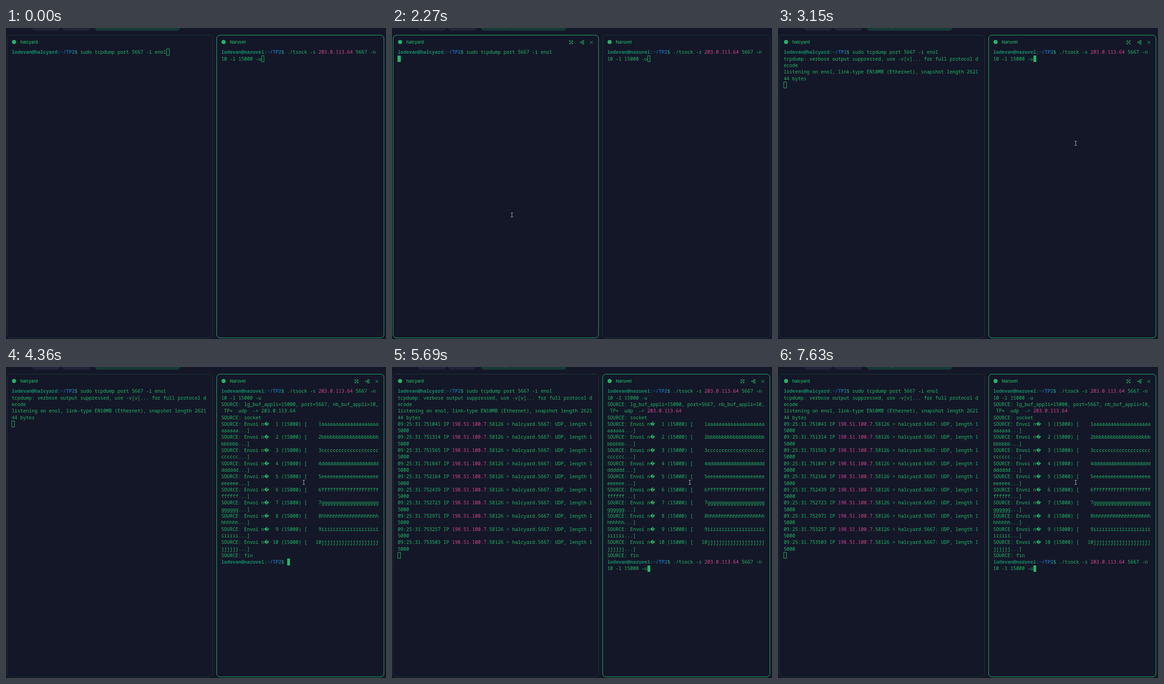
Animation, 827 px wide and 677 px high, one loop 8 s. Source, as an HTML page:

```html
<!DOCTYPE html>
<html lang="en">
<head>
<meta charset="utf-8">
<title>Terminal panes</title>
<style>
  :root { --bg: #141728; --green: #1fb866; --dim: #17392f; --teal: #118b68; --blue: #1769a6; --pink: #d6468f; }
  html, body { margin: 0; width: 100%; height: 100%; overflow: hidden; background: var(--bg); }
  #stage { position: relative; width: 827px; height: 677px; overflow: hidden; background: var(--bg); color: var(--green); }
  #stage > * { position: absolute; }
  .tab { top: -20px; height: 26px; border-radius: 8px; background: #212436; }
  .tab.on { background: #173a37; }
  .tab.on::after { content: ""; position: absolute; left: 54px; top: 20px; width: 2px; height: 1px; background: #1b8a5b; }
  .pane { top: 15px; height: 659.5px; box-sizing: border-box; border: 1px solid var(--dim); border-radius: 8px; }
  .pane::after { content: ""; position: absolute; inset: -1px; border: 1px solid var(--green); border-radius: 8px; opacity: var(--focus, 0); }
  .dot { position: absolute; left: 10px; top: 10px; width: 9px; height: 9px; border-radius: 50%; background: var(--green); }
  .title { position: absolute; left: 28px; top: 8px; font: 500 9.3px/13px Inter, Lato, sans-serif; white-space: pre; }
  .tools { position: absolute; right: 8px; top: 8px; width: 60px; height: 14px; fill: none; stroke: var(--green); }
  .screen { top: 45.4px; font: 10.39px/14.31px "Noto Sans Mono", "DejaVu Sans Mono", monospace; white-space: pre; font-variant-ligatures: none; }
  .row { height: 14.31px; }
  .screen b { color: var(--teal); }
  .screen b + b { color: var(--blue); }
  .screen i { color: var(--pink); font-style: normal; }
  .screen u { display: inline-block; width: 6.234px; font: 10.39px/1 "DejaVu Sans", sans-serif; text-decoration: none; }
  .cursor { position: absolute; box-sizing: border-box; width: 6.6px; height: 14.3px; border: 1px solid var(--green); }
  .cursor.solid { background: var(--green); }
  #mouse { left: -5px; top: -7px; width: 10px; height: 14px; fill: none; }
</style>
</head>
<body>
<div id="stage">
  <div class="tab" style="left:56px;width:62px"></div>
  <div class="tab" style="left:122px;width:62px"></div>
  <div class="tab on" style="left:193px;width:187px"></div>
  <div class="pane" style="left:2px;width:448px"><span class="dot"></span><span class="title">halcyard</span></div>
  <div class="pane" style="left:458px;width:365px"><span class="dot"></span><span class="title">Naruvel</span></div>
  <div class="screen" style="left:12.4px"></div>
  <div class="screen" style="left:468.4px"></div>
  <svg id="mouse" viewBox="-5 -7 10 14">
    <path id="beam" d="M-2.5-4.5H-.7L0-4L.7-4.5H2.5M0-4V4M-2.5 4.5H-.7L0 4L.7 4.5H2.5" stroke="#0a0c14" stroke-width="2.4"/>
    <use href="#beam" style="stroke:#c9ccd4"/>
    <path d="M-2.5-4.5H-.7L0-4L.7-4.5H2.5M0-4V4M-2.5 4.5H-.7L0 4L.7 4.5H2.5" stroke="#c9ccd4"/>
  </svg>
</div>
<script>
const LOOP = 8000, CELL = 6.234, LINE = 14.31;
const panes = [...document.querySelectorAll('.pane')];
const screens = [...document.querySelectorAll('.screen')];
const mouse = document.getElementById('mouse');

const TOOLS = `<svg class="tools" viewBox="0 0 60 14">
  <path d="M5.5 4L12 10.5M12 4L5.5 10.5M5.2 6.2V3.7H7.7M9.8 3.7H12.3V6.2M12.3 8.3V10.8H9.8M7.7 10.8H5.2V8.3"/>
  <path d="M28 7.2H36.5M32.5 3.8V10.6M32.5 3.8H36.5M32.5 10.6H36.5"/>
  <path d="M28 7.2H30M35 3.8H36.8M35 7.2H36.8M35 10.6H36.8" stroke-width="2"/>
  <path d="M49.8 4.2L56 10.4M56 4.2L49.8 10.4"/></svg>`;
panes.forEach(p => p.insertAdjacentHTML('beforeend', TOOLS));
const tools = panes.map(p => p.querySelector('.tools'));

const SERVER = '203.0.113.64', CLIENT = '198.51.100.7';
const ip = (text, lit) => lit ? `<i>${text}</i>` : text;
const prompt = host => `<b>lodevan@${host}</b>:<b>~/TP2</b>$ `;
const sendCmd = lit => [prompt('naruvel') + `./tsock -s ${ip(SERVER, lit)} 5667 -n`, '10 -l 15000 -u'];

const listenCmd = prompt('halcyard') + 'sudo tcpdump port 5667 -i eno1';
const banner = [
  'tcpdump: verbose output suppressed, use -v[v]... for full protocol d', 'ecode',
  'listening on eno1, link-type EN10MB (Ethernet), snapshot length 2621', '44 bytes'
];
const micros = [751041, 751314, 751565, 751847, 752164, 752439, 752723, 752971, 753257, 753503];
const packets = lit => micros.flatMap(us => [
  `09:25:31.${us} IP ${ip(CLIENT, lit)}.58126 > halcyard.5667: UDP, length 1`, '5000'
]);

function sendLog(lit) {
  const out = ['SOURCE: lg_buf_appli=15000, port=5667, nb_buf_appli=10,',
    ` TP=  udp  -> ${ip(SERVER, lit)}`, 'SOURCE: socket'];
  for (let n = 1; n <= 10; n++) {
    const c = String.fromCharCode(96 + n);
    out.push(`SOURCE: Envoi n<u>\uFFFD</u>${String(n).padStart(4)} (15000) [${String(n).padStart(5)}${c.repeat(20)}`,
      c.repeat(6) + '...]');
  }
  return [...out, 'SOURCE: fin'];
}

// Each screen is a list of rows plus the cursor cell [column, row].
function leftScreen(t) {
  if (t < 2270) return { rows: [listenCmd], at: [54, 0] };
  if (t < 2340) return { rows: [listenCmd], at: [0, 1] };
  const rows = [listenCmd, ...banner];
  if (t < 4490) return { rows, at: [0, 5] };
  return { rows: [...rows, ...packets(t >= 4630)], at: [0, 25] };
}

// Recalled command: [shown, highlighted, cleared]
const recalls = [[5620, 5690, 5760], [6170, 6240, 7100], [7500, 7630, LOOP]];

function rightScreen(t) {
  if (t < 4360) return { rows: sendCmd(true), at: [14, 1] };
  const rows = [...sendCmd(true), ...sendLog(t >= 4490)];
  const recall = recalls.find(([from, , to]) => t >= from && t < to);
  if (recall) return { rows: [...rows, ...sendCmd(t >= recall[1])], at: [14, 27] };
  return { rows: [...rows, prompt('naruvel')], at: [23, 26] };
}

// Pointer stops: time, x, y
const stops = [
  [120, 535, 584], [190, 440, 505], [260, 335, 443], [330, 255, 414], [400, 221, 408], [470, 261, 407],
  [2740, 285, 397], [2810, 375, 352], [2880, 500, 302], [2950, 596, 266], [3020, 638, 253], [3090, 648, 251]
];

function focusRight(t) {
  if (t < 670 || t >= 3150) return 1;
  return t < 740 || t >= 3090 ? 0.5 : 0;
}

const shown = ['', ''];
function paint(i, { rows, at }, solid) {
  const html = rows.map(r => `<div class="row">${r}</div>`).join('') +
    `<div class="cursor${solid ? ' solid' : ''}" style="left:${at[0] * CELL}px;top:${at[1] * LINE}px"></div>`;
  if (html !== shown[i]) screens[i].innerHTML = shown[i] = html;
}

function draw(t) {
  const right = focusRight(t);
  panes[0].style.setProperty('--focus', 1 - right);
  panes[1].style.setProperty('--focus', right);
  paint(0, leftScreen(t), t >= 670 && t < 3090);
  paint(1, rightScreen(t), t >= 3090);

  const stop = stops.filter(s => s[0] <= t).pop();
  mouse.style.visibility = stop ? 'visible' : 'hidden';
  if (stop) mouse.style.transform = `translate(${stop[1]}px, ${stop[2]}px)`;
  const overLeft = stop && stop[1] < 450;
  const overRight = stop && t >= 2740 && stop[1] > 458;
  tools[0].style.visibility = overLeft ? 'visible' : 'hidden';
  tools[1].style.visibility = overRight ? 'visible' : 'hidden';
}

const start = performance.now();
function tick() {
  draw((performance.now() - start) % LOOP);
  requestAnimationFrame(tick);
}
tick();
</script>
</body>
</html>
```
